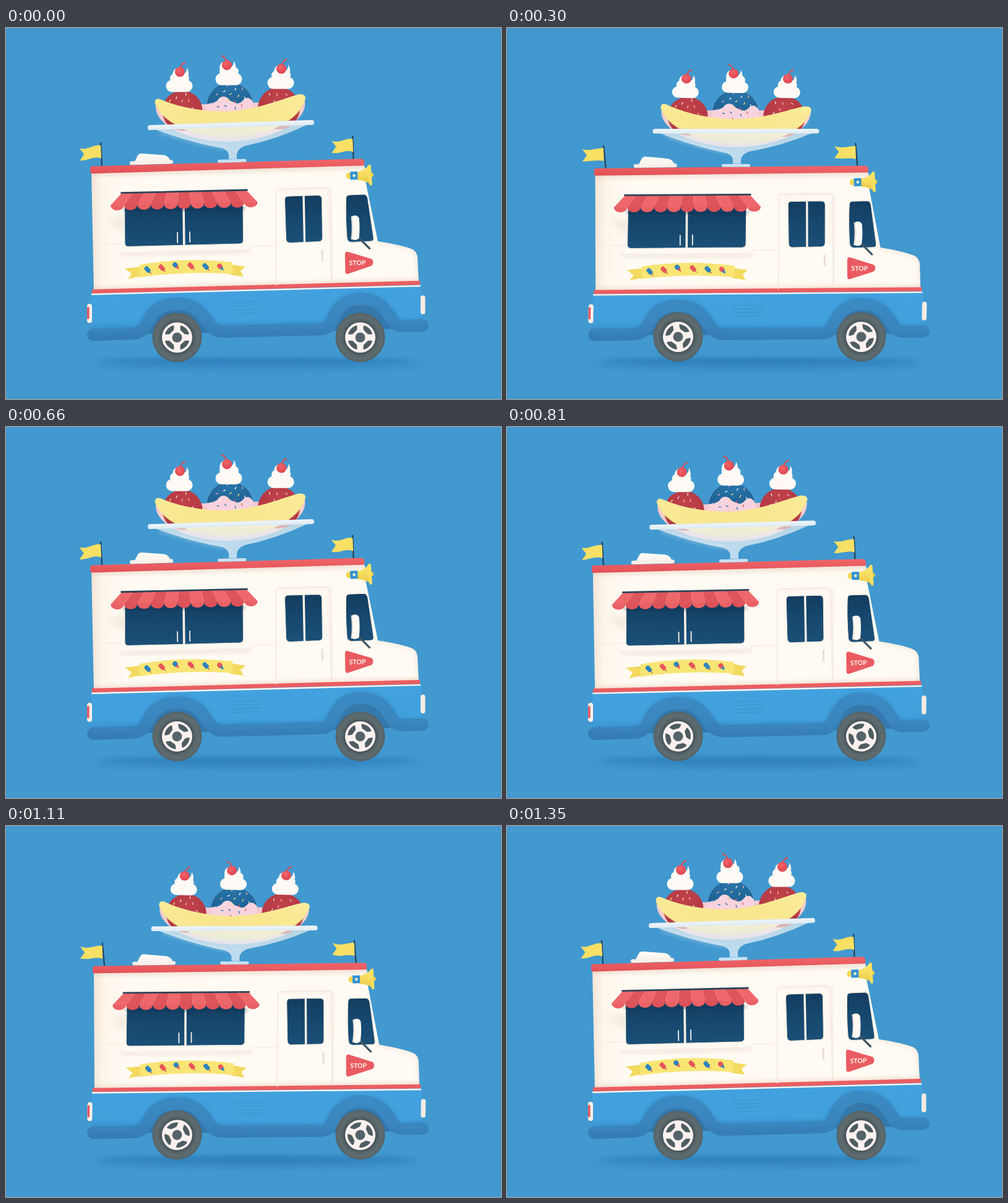
Animation, 800 px wide and 600 px high, one loop 1.38 s. Source, as an HTML page:

```html
<!DOCTYPE html>
<html lang="en">
<head>
<meta charset="utf-8">
<title>Ice cream truck</title>
<style>
html, body { margin: 0; width: 100%; height: 100%; overflow: hidden; background: #4299cf; }
svg { display: block; width: 100vw; height: 100vh; }
</style>
</head>
<body>
<svg viewBox="0 0 800 600" fill="none" stroke-linecap="round" stroke-linejoin="round">
  <defs>
    <filter id="b3" x="-20%" y="-50%" width="140%" height="200%"><feGaussianBlur stdDeviation="3"/></filter>
    <filter id="b6" x="-20%" y="-100%" width="140%" height="300%"><feGaussianBlur stdDeviation="6"/></filter>
    <linearGradient id="wall">
      <stop offset="0" stop-color="#f3e4d6"/><stop offset=".035" stop-color="#fdf6ec"/>
      <stop offset=".1" stop-color="#fffaf2"/><stop offset="1" stop-color="#fffaf3"/>
    </linearGradient>
    <linearGradient id="skirt" x2="0" y2="1">
      <stop offset="0" stop-color="#42a2df"/><stop offset=".7" stop-color="#41a0dd"/><stop offset="1" stop-color="#3b93cf"/>
    </linearGradient>
    <linearGradient id="fender" gradientUnits="userSpaceOnUse" x1="0" y1="430" x2="0" y2="506">
      <stop offset="0" stop-color="#3c8bc4"/><stop offset=".6" stop-color="#3a85bd"/><stop offset="1" stop-color="#347bb2"/>
    </linearGradient>
    <linearGradient id="roof" x2="0" y2="1">
      <stop offset="0" stop-color="#f0666a"/><stop offset="1" stop-color="#e25157"/>
    </linearGradient>
    <linearGradient id="glass" x2="0" y2="1">
      <stop offset="0" stop-color="#133d60"/><stop offset=".5" stop-color="#17486e"/><stop offset="1" stop-color="#1b5078"/>
    </linearGradient>
    <linearGradient id="banana" x2="0" y2="1">
      <stop offset="0" stop-color="#fbec9c"/><stop offset=".55" stop-color="#f8e68c"/><stop offset="1" stop-color="#f5e296"/>
    </linearGradient>
    <linearGradient id="bowl" x2="0" y2="1">
      <stop offset="0" stop-color="#f3f4ef" stop-opacity=".66"/><stop offset=".5" stop-color="#e0ebf4" stop-opacity=".78"/>
      <stop offset="1" stop-color="#c3dff2" stop-opacity=".94"/>
    </linearGradient>
    <linearGradient id="horn" x2="0" y2="1">
      <stop offset="0" stop-color="#fdeb74"/><stop offset="1" stop-color="#edcb47"/>
    </linearGradient>
    <radialGradient id="berry" cx=".5" cy=".3" r=".75">
      <stop offset="0" stop-color="#c0424a"/><stop offset="1" stop-color="#ad3541"/>
    </radialGradient>
    <radialGradient id="blue" cx=".5" cy=".3" r=".75">
      <stop offset="0" stop-color="#2773a8"/><stop offset="1" stop-color="#1f6294"/>
    </radialGradient>
    <radialGradient id="cherry" cx=".4" cy=".35" r=".7">
      <stop offset="0" stop-color="#f2646a"/><stop offset="1" stop-color="#dd434d"/>
    </radialGradient>
    <radialGradient id="tire">
      <stop offset=".6" stop-color="#4d5b60"/><stop offset=".85" stop-color="#5f6d70"/><stop offset="1" stop-color="#546266"/>
    </radialGradient>
    <clipPath id="wallClip"><use href="#wallShape"/></clipPath>
    <clipPath id="skirtClip"><use href="#skirtShape"/></clipPath>
    <clipPath id="scoopClip"><circle cx="362" cy="125.500" r="37.500"/></clipPath>
    <clipPath id="panes"><use href="#hatch"/><use href="#doorPane"/><use href="#cabPane"/></clipPath>
  </defs>

  <rect width="800" height="600" fill="#4299cf"/>
  <g id="shade">
    <ellipse cx="406" cy="543" rx="265" ry="9" fill="#2875b2" opacity=".5" filter="url(#b6)"/>
    <ellipse cx="406" cy="538" rx="250" ry="4" fill="#2875b2" opacity=".5" filter="url(#b3)"/>
  </g>

  <g id="truck">
    <g id="flags"></g>

    <path id="skirtShape" d="M138 428L671 415L673 484L138 496Z" fill="url(#skirt)"/>
    <path id="wallShape" d="M138 232L578 220Q581 224 581.500 250L601 345Q640 351 657 358Q664 362 665 371L667 414L142 428Z" fill="url(#wall)"/>
    <g clip-path="url(#wallClip)">
      <path d="M137 236L580 224" stroke="#e5cfbd" stroke-width="7" opacity=".6" filter="url(#b3)"/>
      <path d="M138 424L670 410" stroke="#ecd3c1" stroke-width="9" opacity=".65" filter="url(#b3)"/>
      <path d="M601 345Q640 351 657 358Q664 362 665 371L668 414" stroke="#f0dfd2" stroke-width="6" opacity=".6" filter="url(#b3)"/>
      <path d="M158 302Q175 316 200 300L190 330" fill="#d9c8b8" opacity=".35" filter="url(#b6)"/>
      <path d="M143 350L192 349M394 353L438 352M526 260L527 416" stroke="#f3e9dd" stroke-width="1"/>
    </g>

    <!-- skirt -->
    <g clip-path="url(#skirtClip)">
      <use href="#rail" stroke="#2a79b6" stroke-width="28" opacity=".5" filter="url(#b3)"/>
      <path d="M138 430L138 490" stroke="#2f80bd" stroke-width="7" opacity=".5" filter="url(#b3)"/>
    </g>
    <path d="M367 444L413 442M367 450L413 448M367 456L413 454M367 462L413 460" stroke="#3a95d1" stroke-width="1.200"/>
    <path d="M139 426L669 412" stroke="#ec5d61" stroke-width="6.500" stroke-linecap="butt"/>
    <path d="M138 430.700L670 417" stroke="#fff5ee" stroke-width="2.400" stroke-linecap="butt"/>
    <!-- lamps -->
    <rect x="131" y="446" width="8" height="31" rx="4" fill="#fbeee6"/>
    <rect x="131" y="451" width="3.600" height="20" rx="1.800" fill="#e9575c"/>
    <rect x="670" y="432.500" width="7.500" height="30.500" rx="3.700" fill="#f8ece2"/>
    <!-- wheel arches -->
    <path d="M222 495C240 470 236 451 278 449C320 451 318 472 334 493ZM520 490C536 466 532 443 572 441C614 443 612 464 632 486Z" fill="#3578ab"/>
    <path id="rail" d="M141 496L205 494C228 493 226 474 238 461C250 449 262 446 278 446C300 446 312 455 322 470C330 483 336 491 350 491L510 487C528 486 526 468 537 455C546 444 556 438 572 438C594 438 606 446 616 460C626 474 626 482 642 482L673 481" stroke-width="20"/>
    <use href="#rail" stroke="url(#fender)" stroke-width="20"/>
    <path d="M141 490L205 488M350 485L510 481M645 476L673 475" stroke="#4190c9" stroke-width="5" opacity=".5" filter="url(#b3)"/>

    <!-- roof -->
    <path d="M208 216L213 206Q215 202.500 220 203L255 205.500Q263 207 265 214Z" fill="#fffaf4"/>
    <path d="M213 213Q235 208 264 213" stroke="#e9dfd8" stroke-width="3" opacity=".6" filter="url(#b3)"/>
    <path d="M203 218.500L267 216.500" stroke="#f8f0e9" stroke-width="6"/>
    <path d="M139 223.500L574 211.500Q579 212 579 217L579 222.500L139 235.500Q136 235 136 231L136 227Q136 224 139 223.500Z" fill="url(#roof)"/>

    <!-- serving hatch -->
    <path id="hatch" d="M192 284L383 281L383.500 343Q383.500 348.500 378 349L198 353.500Q192 353.500 192 348Z" fill="url(#glass)" stroke="#efe4d8" stroke-width="1"/>
    <path d="M287 284L287.800 351" stroke="#f6efe6" stroke-width="3.600" stroke-linecap="butt"/>
    <path d="M277 331L277.300 347M297 330L297.300 346" stroke="#f8f4ee" stroke-width="1.800"/>
    <path d="M187 367L393 361" stroke="#dcc9b8" stroke-width="4" opacity=".5" filter="url(#b3)"/>
    <path d="M185.500 362.500L392.500 357.500" stroke="#f7eee6" stroke-width="6"/>
    <path d="M186 361L392 356" stroke="#fffaf4" stroke-width="2.500"/>
    <path d="M194 295L382 291" stroke="#0d3053" stroke-width="8" opacity=".4" filter="url(#b3)"/>
    <g id="awning"></g>
    <path d="M186.500 266.700L389.500 262" stroke="#2d4458" stroke-width="2.800"/>

    <!-- ribbon -->
    <path d="M192 389L218 386L218 401L197 406L203 397Z" fill="#f3da5e"/>
    <path d="M362 382L387 386L379 393L384 402L362 399Z" fill="#f3da5e"/>
    <path d="M214 403L221 401L214 398ZM367 399L360 396L367 394Z" fill="#d6b848"/>
    <path d="M216 383Q290 370 366 379L367 398Q290 392 214.500 403.500Z" fill="#f9e574"/>
    <g id="treats"></g>

    <!-- door -->
    <path d="M437 416L436 266Q436 261 441 260.800L517 258.500Q523 258.500 523 264L526 412" stroke="#f3e8dd" stroke-width="1.500"/>
    <path d="M443 262L517 260Q521 260 521 266L522 340" stroke="#ead9ca" stroke-width="3" opacity=".4" filter="url(#b3)"/>
    <path id="doorPane" d="M456 272L504 270.500Q510 270.500 510.500 276L511.500 339Q511.500 345 506 345.500L459 347.500Q453 347.500 452.500 341L450.500 278Q450.500 272 456 272Z" fill="url(#glass)" stroke="#efe3d6" stroke-width="1"/>
    <path d="M481 271.500L482.500 346.500" stroke="#f8f1e8" stroke-width="3.400" stroke-linecap="butt"/>
    <path d="M511 360L511.500 376" stroke="#e9ded3" stroke-width="3"/>

    <!-- cab -->
    <path id="cabPane" d="M555 270L578 269Q583 269 584.500 275L594 339Q595 345 589 345L559 346.500Q551.500 346.500 551 339Q548.500 305 549.500 276Q549.500 270 555 270Z" fill="url(#glass)" stroke="#f1e6da" stroke-width="1"/>
    <g clip-path="url(#panes)"><g id="glare" fill="#bfe0f5"></g></g>
    <path d="M570 339L587.500 356.500" stroke="#3d5565" stroke-width="3.200"/>
    <path d="M559 304.500Q567 301 570.500 307Q572.500 323 570.500 340Q566 345 558.500 341.500Q561 323 559 304.500Z" fill="#fffaf4"/>
    <path d="M558.500 305.500Q561 323 558.500 341" stroke="#e4ddd7" stroke-width="2"/>
    <path d="M552.500 362L591 373.500Q596 378.500 591 384.500L553 397.500Q548.500 398.500 548.300 394L547.800 366Q548 361 552.500 362Z" fill="#ea5b61"/>
    <text x="568" y="383.500" transform="rotate(-1.500 568 380)" fill="#fff6f0" text-anchor="middle" font-family="Lato, sans-serif" font-weight="700" font-size="10.500">STOP</text>

    <!-- horn -->
    <ellipse cx="554" cy="239" rx="4.500" ry="5" fill="#f3d855"/>
    <circle cx="590.500" cy="237.500" r="3.500" fill="#eccb46"/>
    <path d="M567 233Q579 231 586 222L588 252Q580 246 568 246Z" fill="url(#horn)"/>
    <path d="M587.500 223L589.500 252.500" stroke="#f8e062" stroke-width="4.500"/>
    <path d="M556 232.500L568 232L568.500 245L556.500 245.500Z" fill="#3492d0"/>
    <circle cx="562.500" cy="238.700" r="2.300" fill="#fff3d8"/>

    <g id="sundae">
      <path d="M242 126C240 158 296 184 360 184C430 182 488 152 483 118Z" fill="#f5c9d2"/>
      <circle cx="285" cy="134" r="32.500" fill="url(#berry)"/>
      <circle cx="441" cy="130" r="34" fill="url(#berry)"/>
      <g clip-path="url(#scoopClip)">
        <rect x="320" y="85" width="84" height="80" fill="#f8d3dd"/>
        <path d="M320 85H404V119Q398 119 394 114Q388 111 383 117Q376 125 369 120Q362 119 358 113Q350 108 344 114Q340 121 333 120Q329 124 320 122Z" fill="url(#blue)"/>
      </g>
      <g id="sprinkles" stroke-width="1.400"></g>
      <g id="toppings"></g>
      <g id="peel">
        <path d="M240.500 121Q241 112 250 115.500C285 131 330 136 362 134.500C410 131 445 115 472 107.500Q484 105.500 484 114C474 150 425 175 362 177C300 177 250 151 240.500 121Z" fill="url(#banana)"/>
        <path d="M252 138C290 162 420 162 475 132" stroke="#fdf0a6" stroke-width="7" opacity=".35" filter="url(#b3)"/>
      </g>
      <path d="M238 163Q300 186 349 194Q359 198 360 205L360 212L373 212L373 204Q374 196 385 191Q438 180 488 156Z" fill="url(#bowl)"/>
      <path d="M250 168Q310 187 352 194" stroke="#edf6fc" stroke-width="3" opacity=".5" filter="url(#b3)"/>
      <path d="M344.500 215.500L386 214.300" stroke="#c8e1f3" stroke-width="5"/>
      <path d="M233 161L494 152.800" stroke="#e1edf6" stroke-width="8"/>
      <path d="M234 159.500L493 151.300" stroke="#f1f7fa" stroke-width="3" opacity=".7"/>
    </g>
  </g>
  <g id="wheels"></g>
</svg>
<script>
const $ = id => document.getElementById(id);
const NS = 'http://www.w3.org/2000/svg';
const TAU = Math.PI * 2;

function add(parent, tag, attrs) {
  const node = document.createElementNS(NS, tag);
  for (const name in attrs) node.setAttribute(name, attrs[name]);
  return parent.appendChild(node);
}
const set = (node, name, value) => node.setAttribute(name, value);
const mix = (a, b, u) => a + (b - a) * u;

function makeAwning() {
  const n = 11;
  const edge = j => {
    const u = j / n;
    return { tx: mix(187, 389, u), ty: mix(267, 263, u), bx: mix(169, 406.5, u), by: mix(287, 281.5, u) };
  };
  for (let i = 0; i < n; i++) {
    const a = edge(i), b = edge(i + 1);
    const scallop = `${b.bx} ${b.by}A10.8 8.2 0 0 1 ${a.bx} ${a.by}Z`;
    add($('awning'), 'path', {
      d: `M${a.tx} ${a.ty}L${b.tx} ${b.ty}L${scallop}`, fill: i % 2 ? '#de555b' : '#ee686b'
    });
    add($('awning'), 'path', { d: `M${a.bx} ${a.by}L${scallop}`, fill: '#d7424d', opacity: .18 });
  }
}

function makeTreats() {
  const spots = [[229, 391], [252, 388], [275, 385], [299, 385], [323, 386], [347, 387]];
  spots.forEach(([x, y], i) => {
    const g = add($('treats'), 'g', { transform: `translate(${x} ${y}) rotate(-42) scale(1.1)` });
    const main = i === 1 || i === 3 ? '#e9565c' : '#2d83bd';
    if (i === 2 || i === 5) {
      add(g, 'path', { d: 'M-3.500 -1L3.500 -1L0 6.500Z', fill: i === 2 ? '#e9565c' : '#2d83bd' });
      add(g, 'circle', { cy: -2.5, r: 3.6, fill: i === 2 ? '#2d83bd' : '#e9565c' });
    } else {
      add(g, 'path', { d: 'M0 3V7', stroke: '#c8674f', 'stroke-width': 1.6 });
      add(g, 'rect', { x: -3.2, y: -5.5, width: 6.4, height: 10, rx: 2.5, fill: main });
    }
  });
}

function makeSprinkles(cx, cy, r, count, colors) {
  for (let i = 0; i < count; i++) {
    const a = i * 2.4 + cx, d = r * Math.sqrt((i + .5) / count) * .88;
    const x = cx + d * Math.cos(a), y = cy + d * Math.sin(a), t = i * 1.9;
    const dx = 1.6 * Math.cos(t), dy = 1.6 * Math.sin(t);
    const color = y > 118 && cx === 362 ? ['#2b79b0', '#e2565e'][i % 2] : colors[i % colors.length];
    add($('sprinkles'), 'path', { d: `M${x - dx} ${y - dy}L${x + dx} ${y + dy}`, stroke: color });
  }
}

// x, y: cherry centre; cx: middle of the cream; side: direction of the stem
function makeTopping(x, y, cx, side) {
  const g = add($('toppings'), 'g', { transform: `translate(${x} ${y})` });
  const o = cx - x;
  add(g, 'rect', { x: o - 21.5, y: 13, width: 43, height: 19.5, rx: 9.7, fill: '#fffaf5' });
  add(g, 'path', { d: `M${o - 13} 16Q${o} 20 ${o + 14} 15`, stroke: '#eee4dd', 'stroke-width': 1.3 });
  add(g, 'rect', { x: o - 15, y: 3, width: 31, height: 15, rx: 7.5, fill: '#fffaf5' });
  add(g, 'path', { d: 'M-11 10Q-14 0 -7 -5L7 3Q12 0 11 -7Q17 2 12 10Z', fill: '#fffaf5' });
  add(g, 'circle', { r: 8, fill: 'url(#cherry)' });
  add(g, 'path', { d: `M${side} -7Q${side * 2} -13 ${side * 8.5} -15`, stroke: '#dc4a52', 'stroke-width': 2 });
}

function makeWheel(x) {
  const wheel = add($('wheels'), 'g', {});
  add(wheel, 'circle', { r: 40, fill: 'url(#tire)' });
  add(wheel, 'circle', { r: 27, fill: '#435157', opacity: .6 });
  const hub = add(wheel, 'g', {});
  add(hub, 'circle', { r: 24.5, fill: '#fbf1ef' });
  const at = (r, a) => `${r * Math.cos(a)} ${r * Math.sin(a)}`;
  for (let i = 0; i < 4; i++) {
    const a = TAU * (i / 4 + .125);
    add(hub, 'path', {
      d: `M${at(14.5, a - .3)}L${at(19, a - .44)}A19 19 0 0 1 ${at(19, a + .44)}L${at(14.5, a + .3)}Z`,
      fill: '#4e5c61', stroke: '#4e5c61', 'stroke-width': 3
    });
  }
  add(hub, 'circle', { r: 8, fill: '#55636a' });
  return { x, wheel, hub };
}

function makeFlag(x, y, lean, rise) {
  const pole = add($('flags'), 'path', { stroke: '#27455d', 'stroke-width': 2.4 });
  const cloth = add($('flags'), 'path', { fill: '#f7e064' });
  const fold = add($('flags'), 'path', { stroke: '#e2c347', 'stroke-width': 4, opacity: .5, filter: 'url(#b3)' });
  return { x, y, lean, rise, pole, cloth, fold };
}

function poseFlag(f, p, k) {
  const a = (f.lean - 3.6 * p) * Math.PI / 180;
  const x = f.x + 37 * Math.sin(a), y = f.y - 37 * Math.cos(a) + 1;
  const phase = TAU * (k - 2) / 18;
  const w = 1.6 * Math.cos(phase) - f.rise, c = 2 * Math.sin(phase);
  const tip = x - 34.5 + 1.7 * Math.cos(phase - TAU / 9);
  set(f.pole, 'd', `M${x} ${y - 1}L${f.x} ${f.y}`);
  set(f.cloth, 'd', `M${x} ${y + 3}C${x - 11} ${y + 1 + c} ${x - 20} ${y + 10 - c} ${tip} ${y + 6.5 + w}` +
    `L${tip + 7.5} ${y + 16 + w}L${tip + .5} ${y + 26 + w}` +
    `C${x - 20} ${y + 27 - c} ${x - 12} ${y + 20 + c} ${x + 1} ${y + 24}Z`);
  set(f.fold, 'd', `M${x - 17} ${y + 9}L${x - 17} ${y + 21}`);
}

makeAwning();
makeTreats();
makeSprinkles(285, 126, 25, 12, ['#f9dfe0', '#f7b9bd', '#f6e08a']);
makeSprinkles(362, 119, 33, 20, ['#f5df78', '#f3a7ae', '#e9f2f7']);
makeSprinkles(441, 122, 27, 12, ['#f9dfe0', '#f7b9bd', '#f6e08a']);
makeTopping(281, 71, 280, 1);
makeTopping(357, 60, 360, -1);
makeTopping(445, 66, 444, 1);
const wheels = [276.5, 572.5].map(makeWheel);
const flags = [makeFlag(155, 223, -3, 0), makeFlag(561.5, 212.5, -2, 2)];
for (const [x, y] of [[345, 320], [497, 310], [572, 308]])
  for (const [o, w] of [[-16, 14], [6, 6]])
    add($('glare'), 'path', { d: `M${x + o - 30} ${y + 42}h${w}l60 -84h${-w}Z` });

// 0 at the top of the bounce, 1 near the bottom
function bounce(k) {
  const ease = u => { u = u ** 1.22; return u * u * (3 - 2 * u); };
  const m = k % 18;
  return ease(Math.min(m, 18 - m) / 9) / ease(8 / 9);
}

function draw(ms) {
  // every fifth step repeats a pose
  const step = Math.floor((ms % 1380) / 30);
  const k = step - Math.floor((step + 4) / 5);
  const p = bounce(k);
  set($('truck'), 'transform', `translate(131 495) rotate(${p}) scale(1 ${1 - .012 * p}) translate(-131 -495)`);
  set($('sundae'), 'transform', `translate(366 216) rotate(${.7 * p}) scale(1 ${1 - .03 * p}) translate(-366 -216)`);
  set($('peel'), 'transform', `rotate(${1.1 * p} 247 130)`);
  for (const w of wheels) {
    set(w.wheel, 'transform', `translate(${w.x} ${500.5 - p})`);
    set(w.hub, 'transform', `rotate(${k * 10})`);
  }
  for (const f of flags) poseFlag(f, p, k);
  set($('glare'), 'transform', `translate(${(5 - k) * 14} 0)`);
  set($('glare'), 'opacity', .14 * Math.max(0, 1 - Math.abs(k - 5) / 3));
  set($('shade'), 'opacity', .92 + .08 * p);
}

const start = performance.now();
function tick() {
  draw(performance.now() - start);
  requestAnimationFrame(tick);
}
tick();
</script>
</body>
</html>
```
